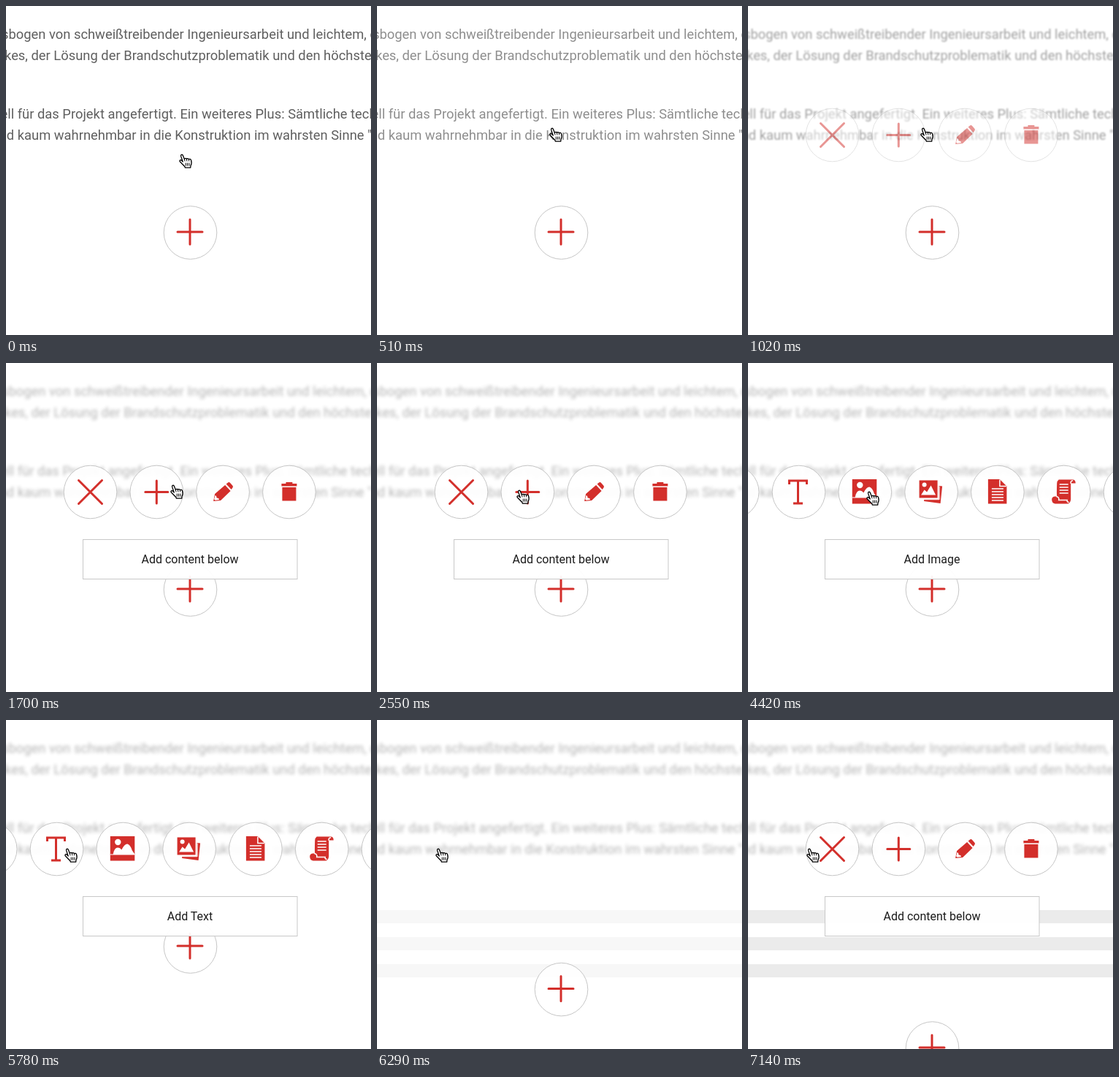
These frames come from a looping animation (500 px wide and 450 px high, 7650 ms). An HTML page:

```html
<!DOCTYPE html>
<html lang="en">
<head>
<meta charset="utf-8">
<title>Content editor menu</title>
<style>
  html, body { margin: 0; width: 100%; height: 100%; overflow: hidden; background: #fff; }
  svg { display: block; width: 100%; height: 100%; font-family: Roboto, sans-serif; }
  .copy { font-size: 18.36px; fill: #5f5f5f; white-space: pre; }
  .disc { fill: #fff; fill-opacity: .93; stroke: #c6c6c6; }
  .red { fill: #d32f2b; }
  .line { fill: none; stroke: #d32f2b; stroke-width: 3; stroke-linecap: round; }
  .cut { fill: #fff; }
  .rule { fill: none; stroke: #fff; stroke-width: 1.5; }
</style>
</head>
<body>
<svg viewBox="0 0 500 450">
  <defs>
    <g id="cross"><path class="line" d="M-16-16 16 16M16-16-16 16"/></g>
    <g id="plus"><path class="line" d="M-15.5 0H15.5M0-15.5V15.5"/></g>
    <g id="pencil">
      <path class="red" d="M-13 12.5-11 2.5 3-9.5 10.5-1.5-3 11.5ZM4.5-11 7-13Q8.5-14 10-12.5L13.5-8.5Q14.5-7 13-5.5L11.5-3.5Z"/>
      <path class="cut" d="M-10.5 4.5-9 5.5-8.5 8-6 8.5-5 10.5-10.5 11.2-12 9.8Z"/>
    </g>
    <g id="trash">
      <path class="red" d="M-10.5-11.5H-4.5V-13.5H4.5V-11.5H10.5V-8H-10.5ZM-9.5-6.5H9.5V12H-9.5Z"/>
    </g>
    <g id="letter">
      <path class="line" style="stroke-linecap:butt" d="M-13-15.5H11M-1-15V15.5M-7.5 15.5H5.5M-13-17V-10.5M11-17V-10.5"/>
    </g>
    <g id="image">
      <path class="red" d="M-17.5-17.5H16V16H-17.5Z"/>
      <circle class="cut" cx="-7" cy="-9.5" r="4.2"/>
      <path class="cut" d="M-13.5 7Q-12-2-7-2-4-2-2 1Q2-7 6-7 10-6 12.5 2L16 7V8H-17.5V7Z"/>
    </g>
    <g id="gallery">
      <path class="red" d="M-16.5-16H8.5V8H-16.5ZM10.5-8.5 15-8 12.5 15.5-10 12.5V10H10.5Z"/>
      <circle class="cut" cx="-9.5" cy="-10" r="3"/>
      <path class="cut" d="M-14 4-9.5-3-6 0-.5-9 6 4Z"/>
      <path class="rule" d="M-12 10.2H11V-8" style="stroke-width:1"/>
    </g>
    <g id="page">
      <path class="red" d="M-13-17.5H3L12.5-8V16H-13Z"/>
      <path class="rule" d="M3-17V-8H12M-8-4.5H8M-8-.5H8M-8 3.5H8M-8 7.5H8M-8 11.5H8"/>
    </g>
    <g id="scroll">
      <path class="red" d="M-7-17H12Q16-17 16-12H9.5V10Q9 16 4 16H-12Q-17 15-16.5 9.5-16 6-12 6H-9.5Q-10 3-9.5-12-9.5-15-7-17Z"/>
      <path class="rule" d="M-6-10.5H6M-6-6.5H6M-6-2.5H6M-6 1.5H6M9.5-11.5Q9-16 12.5-15.5M-10.5 6Q-6 7-7 11H4.5Q4 14 7 14"/>
    </g>
  </defs>

  <g id="copy" class="copy">
    <text x="-6" y="45">sbogen von schweißtreibender Ingenieursarbeit und leichtem, d</text>
    <text x="-2" y="73.5">kes, der Lösung der Brandschutzproblematik und den höchste</text>
    <text x="-7.5" y="153.5">ell für das Projekt angefertigt. Ein weiteres Plus: Sämtliche tech</text>
    <text x="-9.3" y="182.5">nd kaum wahrnehmbar in die Konstruktion im wahrsten Sinne "</text>
  </g>
  <path id="bars" fill="#ebebeb" d="M0 260H500V278H0ZM0 297H500V315H0ZM0 334H500V352H0Z"/>
  <g id="add">
    <circle class="disc" cx="252.5" cy="310" r="36.3"/>
    <path class="line" d="M235 309H269M252 292V326"/>
  </g>
  <g id="actions"></g>
  <g id="types"></g>
  <g id="tip">
    <rect x="105.5" y="241.5" width="293.5" height="54" fill="#fff" fill-opacity=".95" stroke="#c8c8c8"/>
    <text id="label" x="252" y="274.3" font-size="16" text-anchor="middle" fill="#1c1c1c"></text>
  </g>
  <g id="hand" stroke="#000" stroke-width="1.3" stroke-linejoin="round" stroke-linecap="round">
    <path fill="#fff" d="M5.2 11 2.6 3.4C2 1.2 4.6.5 5.4 2.4L7.4 7.6C8 6 10 6.2 10.4 7.4 11 6.2 13 6.4 13.4 7.8 14.2 6.8 16.2 7.4 16.6 9 17.5 12 17.5 14 16 16.4L15.7 19.2H8.4L7.8 17.4C5.6 15.8 3.6 13 1.2 10.8.2 9 2.4 8 3.6 9.4Z"/>
    <path fill="none" stroke-width="1" d="M7.4 7.6 8 10M10.4 7.4 10.9 10M13.4 7.8 13.7 10M9.3 13V16.3M11.6 13V16.3M13.9 13V16.3"/>
  </g>
</svg>
<script>
const LOOP = 7650, STEP = 170;
const el = id => document.getElementById(id);

// A row of round buttons, evenly spaced
function buildRow(id, firstX, icons) {
  el(id).innerHTML = icons.map((icon, i) =>
    `<g transform="translate(${firstX + i * 90.8} 176.5)"><circle class="disc" r="36.3"/>` +
    (icon ? `<use href="#${icon}"/>` : '') + '</g>').join('');
}
buildRow('actions', 115.5, ['cross', 'plus', 'pencil', 'trash']);
buildRow('types', -21.3, ['', 'letter', 'image', 'gallery', 'page', 'scroll', '']);

// Linear interpolation over [time, value] keys, held at both ends
function track(t, keys) {
  let [t0, v0] = keys[0];
  if (t <= t0) return v0;
  for (const [t1, v1] of keys.slice(1)) {
    if (t < t1) return v0 + (v1 - v0) * (t - t0) / (t1 - t0);
    [t0, v0] = [t1, v1];
  }
  return v0;
}
const within = (t, a, b) => t >= a && t < b;
const easeOut = p => 1 - (1 - p) ** 3;

const handX = [[0, 246], [510, 245], [1360, 245], [1700, 234], [1870, 231], [2040, 231],
  [2550, 200], [3740, 200], [4420, 171], [5270, 89]];
const handY = [[0, 212], [510, 176], [1700, 176], [1870, 177], [2040, 177],
  [2550, 183], [3740, 183], [4420, 185]];

function tipText(t) {
  if (within(t, 1700, 2890) || t >= 6970) return 'Add content below';
  if (within(t, 4080, 5100)) return 'Add Image';
  if (within(t, 5100, 6290)) return 'Add Text';
  return '';
}

function draw(t) {
  const copy = el('copy');
  const blur = track(t, [[850, 0], [1190, 2.3]]);
  copy.style.opacity = track(t, [[0, 1], [510, .7], [850, .7], [1190, .46]]);
  copy.style.filter = blur ? `blur(${blur}px)` : 'none';

  el('actions').style.opacity = within(t, 2890, 6290) ? 0
    : t < 2890 ? track(t, [[850, 0], [1190, 1]])
    : track(t, [[6460, 0], [6970, 1]]);
  el('types').style.opacity = within(t, 3230, 6290) ? 1 : 0;

  const open = easeOut(track(t, [[6120, 0], [7140, 1]]));
  el('bars').style.opacity = open;
  el('add').setAttribute('transform', `translate(0 ${139 * open})`);

  const text = tipText(t);
  el('tip').style.opacity = text ? 1 : 0;
  el('label').textContent = text;
  el('hand').setAttribute('transform', `translate(${track(t, handX) - 9} ${track(t, handY) - 10})`);
}

function tick() {
  const t = performance.now() % LOOP;
  draw(Math.floor(t / STEP) * STEP);
  requestAnimationFrame(tick);
}
tick();
</script>
</body>
</html>
```
